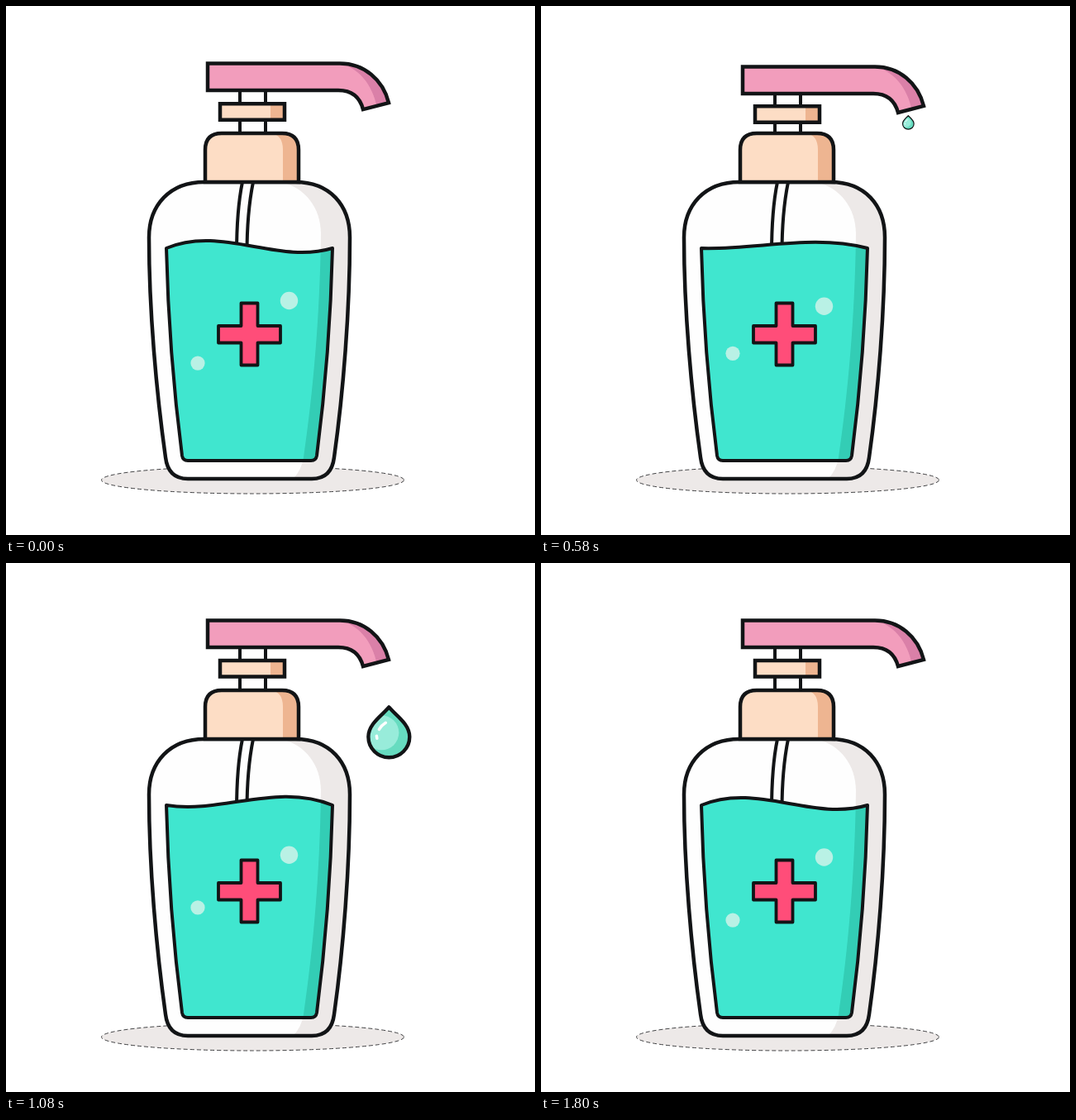
These frames come from a looping animation (640x640 px, 1820 ms). An HTML page with a canvas:

```html
<!DOCTYPE html>
<html lang="en">
<head>
<meta charset="utf-8">
<title>Soap pump</title>
<style>
html, body { margin: 0; width: 100%; height: 100%; overflow: hidden; background: #fff; }
canvas { display: block; width: 100%; height: 100%; }
</style>
</head>
<body>
<canvas id="stage" width="640" height="640"></canvas>
<script>
const ctx = document.getElementById('stage').getContext('2d');
const LOOP = 1820;
const TAU = Math.PI * 2;
const INK = '#121416';
const GREY = '#ede9e8';
const PEACH = '#fdddc5';
const PEACH_DARK = '#eeb591';
const OUTLINE = 4.5;

const clamp = v => Math.max(0, Math.min(1, v));
const ease = p => (1 - Math.cos(Math.PI * clamp(p))) / 2;
const mix = (a, b, p) => a + (b - a) * p;
const shape = d => new Path2D(d);

const bottle = shape('M240 213H350C392 213 416 241 416 280C416 368 408 468 397 546C395 563 386 572 370 572H220C204 572 195 563 193 546C182 468 173 368 173 280C173 241 198 213 240 213Z');
const shadeArea = shape('M328 212C360 217 381 243 381 275C380 370 372 465 360 546Q357 564 345 574H430V212Z');
const straw = shape('M286 213Q279 247 279 300H291.5Q291.5 250 299 213Z');
const collar = shape('M241 213V174Q241 154 261 154H334Q354 154 354 174V213Z');
const collarShade = shape('M322 154Q335 157 335 174V213H356V154Z');
const cross = shape('M284.5 359.5H304.5V387H332V407.5H304.5V434.5H284.5V407.5H257V387H284.5Z');
const spout = shape('M244 69.5H404C433 69.5 456 89 463 117L432 125C428 110 418 102 402 102H244Z');
const spoutShade = shape('M400 69C426 73 443 94 449 123L466 118V69Z');
const plate = shape('M259 118H337V137.5H259Z');
const plateShade = shape('M320 118H337V137.5H320Z');
// Drop is centred on its bounding box
const dropBody = shape('M0 -31C7 -22 25 -11 25 5A25 25 0 0 1 -25 5C-25 -11 -7 -22 0 -31Z');

function disc(x, y, r, color) {
  ctx.fillStyle = color;
  ctx.beginPath();
  ctx.arc(x, y, r, 0, TAU);
  ctx.fill();
}

function part(path, fill, shade, shadeColor, width = OUTLINE) {
  ctx.fillStyle = fill;
  ctx.fill(path);
  if (shade) {
    ctx.save();
    ctx.clip(path);
    ctx.fillStyle = shadeColor;
    ctx.fill(shade);
    ctx.restore();
  }
  ctx.strokeStyle = INK;
  ctx.lineWidth = width;
  ctx.stroke(path);
}

function shifted(dy, draw) {
  ctx.save();
  ctx.translate(0, dy);
  draw();
  ctx.restore();
}

function ground() {
  ctx.beginPath();
  ctx.ellipse(298.5, 573.5, 183, 16.5, 0, 0, TAU);
  ctx.fillStyle = GREY;
  ctx.fill();
  ctx.save();
  ctx.setLineDash([5, 3]);
  ctx.lineWidth = 0.8;
  ctx.strokeStyle = INK;
  ctx.stroke();
  ctx.restore();
}

function liquid(t) {
  const w = (1 - Math.cos(TAU * t / LOOP)) / 2;
  const a = 293 + mix(-28, 14.5, w);
  const b = 293 + mix(20, -32.5, w);
  const body = shape(`M194 293C261 ${a} 328 ${b} 395 293Q392 420 376 544Q375 550 369 550H220Q214 550 213 544Q197 420 194 293Z`);
  ctx.lineJoin = 'round';
  part(body, '#40e6cf', shadeArea, '#33cdb5', 4);
  disc(342.5, 356.8 + 7 * Math.cos(TAU * (t - 470) / LOOP), 10.7, '#b9f1e5');
  disc(232, 423.8 + 8.3 * Math.cos(TAU * t / LOOP), 8.6, '#b9f1e5');
  part(cross, '#ff4d79', null, null, 3.8);
  ctx.lineJoin = 'miter';
}

function pressDepth(t) {
  if (t >= 1080) return 0;
  const p = t % 540;
  return p < 335 ? Math.sin(p / 335 * Math.PI / 2) : 1 - ease((p - 335) / 205);
}

function dropScale(t) {
  if (t < 430 || t > 1615) return 0;
  if (t < 580) return (t - 430) / 150 * 0.27;
  if (t < 1080) return Math.min(1, 0.27 + (t - 580) * 0.00178);
  return clamp(1 - (t - 1080) / 535);
}

function drop(t) {
  const s = dropScale(t);
  if (s <= 0) return;
  const u = t - 580;
  ctx.save();
  ctx.translate(444.3 + 41.5 * ease((t - 560) / 1100), 141 + 0.0517 * u + 0.000153 * u * u);
  ctx.scale(s, s);
  ctx.save();
  ctx.clip(dropBody);
  ctx.fillStyle = '#66dcc0';
  ctx.fillRect(-30, -35, 60, 70);
  disc(-9, 0, 21, '#98ecda');
  ctx.restore();
  ctx.lineJoin = 'round';
  ctx.strokeStyle = INK;
  ctx.lineWidth = 4.4;
  ctx.stroke(dropBody);
  ctx.strokeStyle = '#fff';
  ctx.lineCap = 'round';
  ctx.lineWidth = 3.5;
  ctx.beginPath();
  ctx.moveTo(-12, -4);
  ctx.quadraticCurveTo(-9, -9, -4, -12);
  ctx.moveTo(-15, 4);
  ctx.lineTo(-14.5, 7);
  ctx.stroke();
  ctx.restore();
}

function neck(top) {
  ctx.fillStyle = '#fefefe';
  ctx.fillRect(283, top, 31, 154 - top);
  ctx.fillStyle = INK;
  ctx.fillRect(281, top, 4, 154 - top);
  ctx.fillRect(312, top, 4, 154 - top);
}

function draw(t) {
  ctx.fillStyle = '#fff';
  ctx.fillRect(0, 0, 640, 640);
  ground();
  part(bottle, '#fefefe', shadeArea, GREY);
  part(straw, '#fefefe', null, null, 4);
  liquid(t);

  const press = pressDepth(t);
  const dy = 20.7 * press;
  neck(100 + dy);
  part(collar, PEACH, collarShade, PEACH_DARK);
  shifted(8.7 * Math.pow(press, 0.6), () => part(plate, PEACH, plateShade, PEACH_DARK));
  drop(t);
  shifted(dy, () => part(spout, '#f29dbc', spoutShade, '#da80a8'));
}

function tick() {
  draw(performance.now() % LOOP);
  requestAnimationFrame(tick);
}
tick();
</script>
</body>
</html>
```
